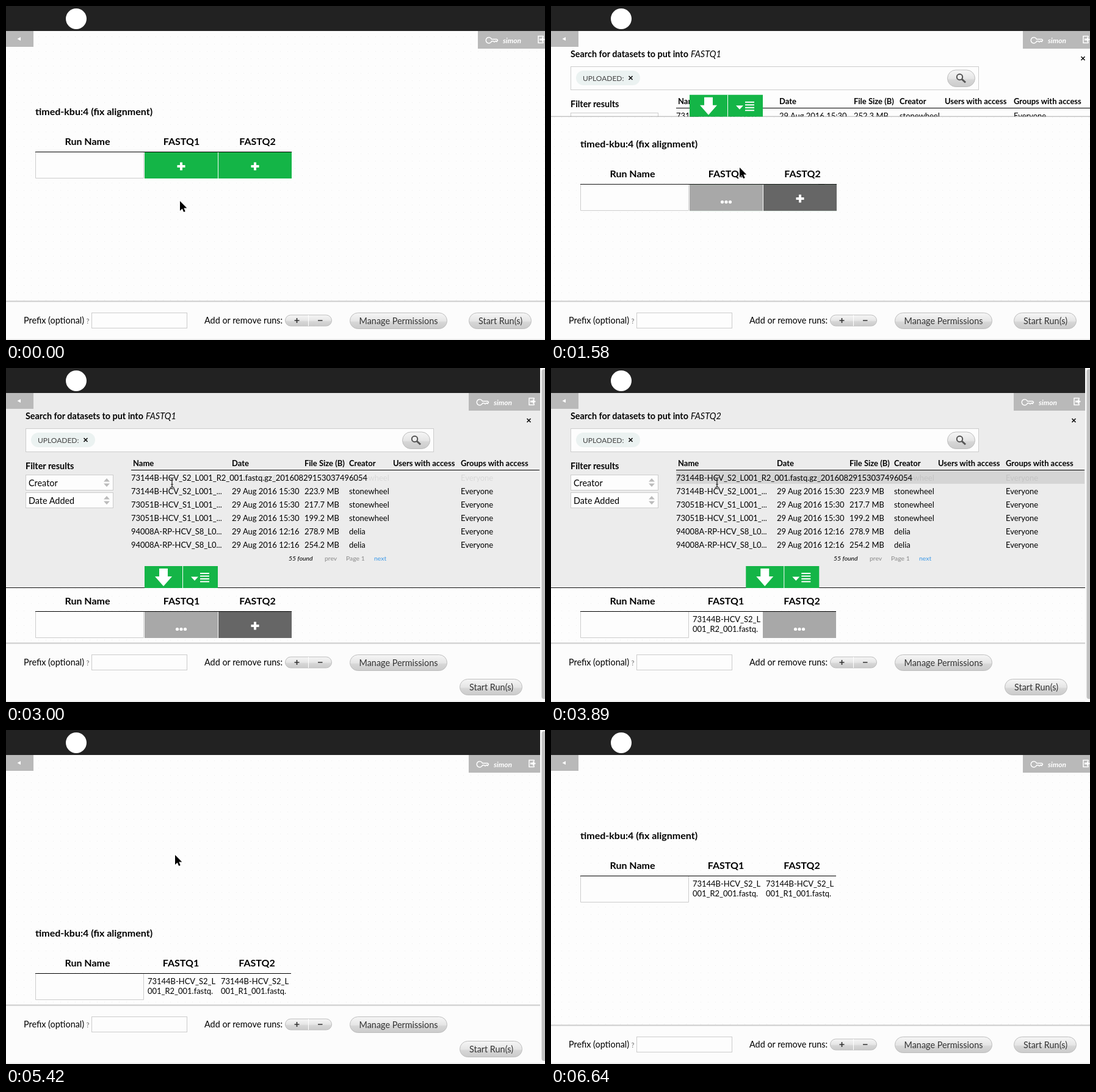
These frames come from a looping animation (883x548 px, 6.94 s). An HTML page:

```html
<!DOCTYPE html>
<html lang="en">
<head>
<meta charset="utf-8">
<title>Choosing run inputs</title>
<style>
@property --shift { syntax: '<length>'; inherits: true; initial-value: 0px; }
@property --panel { syntax: '<length>'; inherits: true; initial-value: 0px; }
@property --slide { syntax: '<length>'; inherits: true; initial-value: 0px; }
@property --wide { syntax: '<number>'; inherits: true; initial-value: 1; }
@property --open { syntax: '<number>'; inherits: true; initial-value: 0; }
@property --fill { syntax: '<number>'; inherits: true; initial-value: 0; }
@property --hover { syntax: '<number>'; inherits: true; initial-value: 0; }
@property --pick { syntax: '<number>'; inherits: true; initial-value: 0; }
@property --arrow { syntax: '<number>'; inherits: true; initial-value: 1; }
@property --beam { syntax: '<number>'; inherits: true; initial-value: 0; }

html, body { margin: 0; width: 100%; height: 100%; overflow: hidden; background: #fdfdfd; }
#stage {
  position: relative; width: 883px; height: 548px; overflow: hidden;
  animation: 6940ms cubic-bezier(.37, 0, .63, 1) infinite;
  animation-name: shift, panel, slide, state;
  animation-timing-function: cubic-bezier(.37, 0, .63, 1), cubic-bezier(.37, 0, .63, 1),
    cubic-bezier(.37, 0, .63, 1), step-end;
}
svg { position: absolute; left: 0; top: 0; display: block; }
text { font-family: Lato, sans-serif; font-size: 14.4px; white-space: pre; }
.big { font-size: 16px; font-weight: 700; }
.bold { font-weight: 700; }
.small { font-size: 12.96px; }
.tiny { font-size: 10.4px; fill: #888; }
.mid { text-anchor: middle; }
.box { fill: #fdfdfd; stroke: #ccc; }
.pill { fill: url(#silver); stroke: #bdbdbd; }
.cross { fill: none; stroke: #111; stroke-width: 1.7; }

/* Moves right by --d pixels while there is no scrollbar. */
.flow { transform: translateX(calc(var(--wide) * var(--d) * 1px)); }
.table { transform: translateY(var(--shift)); }
.head { transform: translateX(calc(min(1, var(--fill)) * -1px)); }
.foot { transform: translateY(calc((var(--wide) - 1) * 33px)); }
.start { transform: translate(calc((var(--wide) - 1) * 15px), calc((1 - var(--wide)) * 7px)); }
.panel { clip-path: inset(41px 0 calc(507px - var(--panel)) 0); }
.edge { transform: translateY(var(--panel)); animation: edge 6940ms infinite; }
.back { animation: back 6940ms infinite; }
.tools { transform: translate(var(--slide), var(--panel)); }
.cursor { animation: move 6940ms ease-in-out infinite; }
.scroll { opacity: calc(1 - var(--wide)); }

.row {
  --on: max(0, 1 - max(var(--hover) - var(--i), var(--i) - var(--hover)));
  --hit: max(0, 1 - max(var(--pick) - var(--i), var(--i) - var(--pick)));
}
.row rect { fill: #d5d5d5; opacity: var(--hit); }
.row .short { opacity: calc(1 - var(--on)); }
.row .full { opacity: var(--on); }
.row .cell { opacity: calc(1 - .92 * var(--on)); }

@keyframes shift {
  0%, 19.96% { --shift: 0px; }
  27.16%, 78.96% { --shift: 160px; }
  86.17%, 100% { --shift: 0px; }
}
@keyframes panel {
  0%, 20.12% { --panel: 0px; }
  25.88%, 77.23% { --panel: 320px; }
  77.24%, 100% { --panel: 0px; }
}
@keyframes slide {
  0%, 54.3% { --slide: 0px; }
  56.9%, 77.23% { --slide: 120px; }
  77.24%, 100% { --slide: 0px; }
}
@keyframes state {
  0% { --wide: 1; --open: 0; --fill: 0; --hover: 0; --pick: 0; --arrow: 1; --beam: 0; }
  7.92% { --arrow: 0; }
  17% { --open: 1; }
  21.83% { --arrow: 1; }
  24.2% { --arrow: 0; --beam: 1; }
  26.37% { --wide: 0; }
  35.01% { --hover: 5; }
  36.17% { --hover: 4; }
  38.11% { --hover: 3; }
  39.77% { --hover: 2; }
  42.15% { --hover: 1; }
  51.87% { --pick: 1; }
  54.46% { --fill: 1; }
  60.37% { --pick: 0; }
  61.38% { --hover: 2; }
  63.83% { --hover: 3; }
  71.47% { --hover: 2; }
  76.37% { --pick: 2; }
  77.23% { --pick: 0; --hover: 0; --fill: 2; --arrow: 1; --beam: 0; }
  79.75% { --wide: 1; }
  95.6% { --arrow: 0; }
}
@keyframes back {
  0%, 22.9% { fill: #fdfdfd; }
  25.9%, 100% { fill: #ececec; }
}
@keyframes edge {
  0%, 22.9% { fill: #999; }
  25.9%, 100% { fill: #111; }
}
@keyframes move {
  0%, .72% { transform: translate(285px, 320px); }
  7.92% { transform: translate(299px, 265px); }
  8%, 24% { transform: translate(309px, 265px); }
  24.3%, 34.5% { transform: translate(311px, 267px); }
  43.2%, 60.37% { transform: translate(272px, 188px); }
  67%, 69.6% { transform: translate(280px, 230px); }
  72.91%, 87% { transform: translate(277px, 205px); }
  95.6%, 100% { transform: translate(802px, 527px); }
}
</style>
</head>
<body>
<div id="stage">

<svg width="883" height="548">
  <defs>
    <pattern id="dots" width="12" height="12" patternUnits="userSpaceOnUse">
      <rect x="5" y="2" width="1" height="1" fill="#ededed"/>
    </pattern>
    <linearGradient id="silver" x2="0" y2="1">
      <stop offset="0" stop-color="#f6f6f6"/>
      <stop offset=".5" stop-color="#e6e6e6"/>
      <stop offset=".6" stop-color="#d6d6d6"/>
      <stop offset="1" stop-color="#cbcbcb"/>
    </linearGradient>
    <path id="plus" d="M-6.5 0H6.5M0 -6.5V6.5" stroke="#fff" stroke-width="4"/>
    <g id="more" fill="#fff">
      <circle cx="-6.5" r="2.6"/><circle r="2.6"/><circle cx="6.5" r="2.6"/>
    </g>
  </defs>
  <rect width="883" height="548" fill="#fdfdfd"/>
  <rect y="41" width="883" height="444" fill="url(#dots)"/>

  <g class="table">
    <text class="big" x="48" y="179">timed-kbu:4 (fix alignment)</text>
    <text class="big mid" x="133.5" y="228">Run Name</text>
    <g class="head">
      <text class="big mid" x="287.5" y="228">FASTQ1</text>
      <text class="big mid" x="412" y="228">FASTQ2</text>
      <rect x="438" y="239" width="30" height="1"/>
    </g>
    <rect x="48" y="239" width="400" height="1"/>
    <path class="box" d="M48.5 240V282.5H225.5V240"/>

    <g id="cell1">
      <rect x="227" y="240" width="120" height="43" fill="#14b547"/>
      <use href="#plus" x="287" y="263"/>
      <g style="opacity:var(--open)">
        <rect x="227" y="240" width="120" height="43" fill="#a8a8a8"/>
        <use href="#more" x="287" y="268.5"/>
      </g>
      <g style="opacity:min(1, var(--fill))">
        <rect x="227" y="240" width="121" height="43" fill="#fdfdfd"/>
        <text class="small" x="232" y="257">73144B-HCV_S2_L</text>
        <text class="small" x="232" y="273">001_R2_001.fastq.</text>
      </g>
    </g>
    <g id="cell2">
      <g style="opacity:calc(1 - var(--fill))">
        <rect x="348" y="240" width="120" height="43" fill="#14b547"/>
        <use href="#plus" x="408" y="263"/>
        <g style="opacity:var(--open)">
          <rect x="348" y="240" width="120" height="43" fill="#666"/>
          <use href="#plus" x="408" y="263"/>
        </g>
      </g>
      <g style="opacity:min(1, var(--fill))">
        <rect x="347" y="240" width="120" height="43" fill="#a8a8a8"/>
        <use href="#more" x="407" y="268.5"/>
      </g>
      <g style="opacity:calc(var(--fill) - 1)">
        <rect x="347" y="240" width="121" height="43" fill="#fdfdfd"/>
        <text class="small" x="352" y="257">73144B-HCV_S2_L</text>
        <text class="small" x="352" y="273">001_R1_001.fastq.</text>
      </g>
    </g>
  </g>

  <g class="foot">
    <rect y="484" width="883" height="110" fill="#fcfcfc"/>
    <rect y="483.5" width="883" height="2" fill="#ccc"/>
    <text x="29" y="521">Prefix (optional)</text>
    <text x="131.5" y="521" style="font-size:11px" fill="#666">?</text>
    <rect class="box" x="140.5" y="503.5" width="156" height="25"/>
    <text x="325" y="521">Add or remove runs:</text>
    <rect class="pill" x="457.5" y="507" width="76" height="18" rx="9"/>
    <path d="M495.5 507V525" stroke="#fff"/>
    <path d="M472.5 516H480.5M476.5 512V520M511 516H518.5" stroke="#333" stroke-width="1.7"/>
    <rect class="pill" x="563.5" y="503.5" width="159" height="26" rx="13"/>
    <text class="mid" x="643" y="522" fill="#333">Manage Permissions</text>
  </g>
  <g class="start">
    <rect class="pill" x="758.5" y="503.5" width="102" height="26" rx="13"/>
    <text class="mid" x="810" y="522" fill="#333">Start Run(s)</text>
  </g>
  <rect y="546.5" width="883" height="1" fill="#e2e2e2"/>
</svg>

<svg class="panel" width="883" height="548">
  <rect class="back" y="41" width="883" height="320"/>
  <text class="bold" x="32" y="84">Search for datasets to put into</text>
  <g font-style="italic">
    <text x="229" y="84" style="opacity:calc(1 - var(--fill))">FASTQ1</text>
    <text x="229" y="84" style="opacity:var(--fill)">FASTQ2</text>
  </g>
  <path class="cross flow" style="--d:15" d="M853.5 83L859.5 89M859.5 83L853.5 89"/>

  <rect class="box" x="32.5" y="99.5" width="668" height="38"/>
  <rect x="41" y="106" width="105" height="24" rx="12" fill="#ebf2f1"/>
  <text x="52" y="122.5" fill="#444" style="font-size:12px">UPLOADED:</text>
  <path class="cross" d="M127.5 115L133.5 121M133.5 115L127.5 121"/>
  <rect class="pill" x="649.5" y="105" width="45" height="27.5" rx="13.7"/>
  <circle cx="669.5" cy="116.5" r="4.7" fill="#eee" stroke="#555" stroke-width="2"/>
  <path d="M673 120L679 125.5" stroke="#555" stroke-width="3"/>

  <text class="bold" x="32" y="166">Filter results</text>
  <g id="filters"></g>
  <g id="results"></g>
  <rect class="flow" style="--d:15" x="800" y="167" width="74" height="1"/>
  <rect x="205" y="167" width="620" height="1"/>

  <text class="tiny" x="463" y="316" font-style="italic" style="fill:#000">55 found</text>
  <text class="tiny" x="522" y="316">prev</text>
  <text class="tiny" x="557" y="316">Page 1</text>
  <text class="tiny" x="603" y="316" style="fill:#3b99e8">next</text>

  <rect class="edge" y="40" width="883" height="1"/>
  <g class="tools">
    <rect x="227" y="5" width="120" height="36" fill="#14b547"/>
    <path d="M289.5 5V41" stroke="#fff"/>
    <path d="M251 9H265V22H272L258 38L244 22H251ZM303 22.5H315L309 29Z" fill="#fff"/>
    <path d="M318 17H333M318 21.5H333M318 26H333M318 30.5H333" stroke="#fff" stroke-width="2"/>
  </g>
</svg>

<svg width="883" height="548">
  <rect width="883" height="41" fill="#222"/>
  <circle cx="115" cy="21" r="17" fill="#fff"/>
  <rect y="41" width="45" height="26" fill="#b9b9b9"/>
  <path d="M18.5 54L24 51V57Z" fill="#fff"/>
  <g class="flow" style="--d:15">
    <rect x="758" y="41" width="130" height="29" fill="#b9b9b9"/>
    <g fill="none" stroke="#fff" stroke-width="1.5">
      <path d="M780.5 54.5A4.8 4.8 0 1 0 780.5 58L783 57.5L785 59L787 57.5L789 58.5L790.5 56L789 54.5Z"/>
      <path d="M865 52V49.5H857V60.5H865V58"/>
    </g>
    <path d="M859 53.5H863V51L868 55L863 59V56.5H859Z" fill="#fff"/>
    <text x="799" y="61" class="bold" font-style="italic" fill="#fff" style="font-size:12px">simon</text>
  </g>
  <g class="scroll">
    <rect x="875" width="8" height="548" fill="#fafafa"/>
    <rect x="877.5" y="2" width="8" height="541" rx="4" fill="#c1c1c1"/>
  </g>
  <g class="cursor">
    <path style="opacity:var(--arrow)" d="M0 0V16L3.7 12.5L6.2 18L8.7 17L6.3 11.6H11.3Z"
      stroke="#fff" stroke-width="1.2" paint-order="stroke"/>
    <path style="opacity:var(--beam)" fill="none" stroke="#222" stroke-width="1.2"
      d="M-3.5 -8Q0 -8 0 -5.5Q0 -8 3.5 -8M0 -5.5V5.5M-3.5 8Q0 8 0 5.5Q0 8 3.5 8M-2 3H2"/>
  </g>
</svg>
</div>

<script>
const byId = id => document.getElementById(id);
const label = (x, y, text, cls, d = 0) =>
  `<text class="${cls}" x="${x}" y="${y}" style="--d:${d}">${text}</text>`;

byId('filters').innerHTML = ['Creator', 'Date Added'].map((name, i) => `
  <g transform="translate(0 ${i * 29})">
    <rect class="box" x="32.5" y="175.5" width="143" height="25"/>
    <path d="M160 186.5L165 181L170 186.5ZM160 189.5L165 195L170 189.5Z" fill="#bbb"/>
    ${label(37, 193.5, name, '')}
  </g>`).join('');

// Left edge, extra offset without scrollbar, heading
const columns = [
  [208, 0, 'Name'], [370, 4, 'Date'], [489, 7, 'File Size (B)'],
  [562, 9, 'Creator'], [634, 11, 'Users with access'], [745, 13, 'Groups with access']
];
const [, date, size, creator, , groups] = columns;

// Sample, time, uploader, read sizes, upload stamps
const samples = [
  ['73144B-HCV_S2', '15:30', 'stonewheel', [252.3, 223.9], ['3037496054', '3036281947']],
  ['73051B-HCV_S1', '15:30', 'stonewheel', [217.7, 199.2], ['3017361586', '3016154072']],
  ['94008A-RP-HCV_S8', '12:16', 'delia', [278.9, 254.2], ['1642708315', '1641593826']]
];

const rows = samples.flatMap(([id, time, user, sizes, stamps]) =>
  sizes.map((mb, n) => {
    const full = `${id}_L001_R${2 - n}_001.fastq.gz_20160829${time.slice(0, 2)}${stamps[n]}`;
    return { full, short: full.slice(0, 19) + '...', time, user, mb };
  }));

byId('results').innerHTML =
  columns.map(([x, d, name]) => label(x, 161, name, 'small bold flow', d)).join('') +
  rows.map((r, i) => {
    const y = 184.5 + 22 * i;
    const cell = ([x, d], text) => label(x, y, text, 'small cell flow', d);
    return `<g class="row" style="--i:${i + 1}">
      <rect x="205" y="${168 + 22 * i}" width="669" height="22"/>
      ${label(205, y, r.short, 'small short')}
      ${label(205, y, r.full, 'small full')}
      ${cell(date, '29 Aug 2016 ' + r.time)}
      ${cell(size, r.mb.toFixed(1) + ' MB')}
      ${cell(creator, r.user)}
      ${cell(groups, 'Everyone')}
    </g>`;
  }).join('');
</script>
</body>
</html>
```
